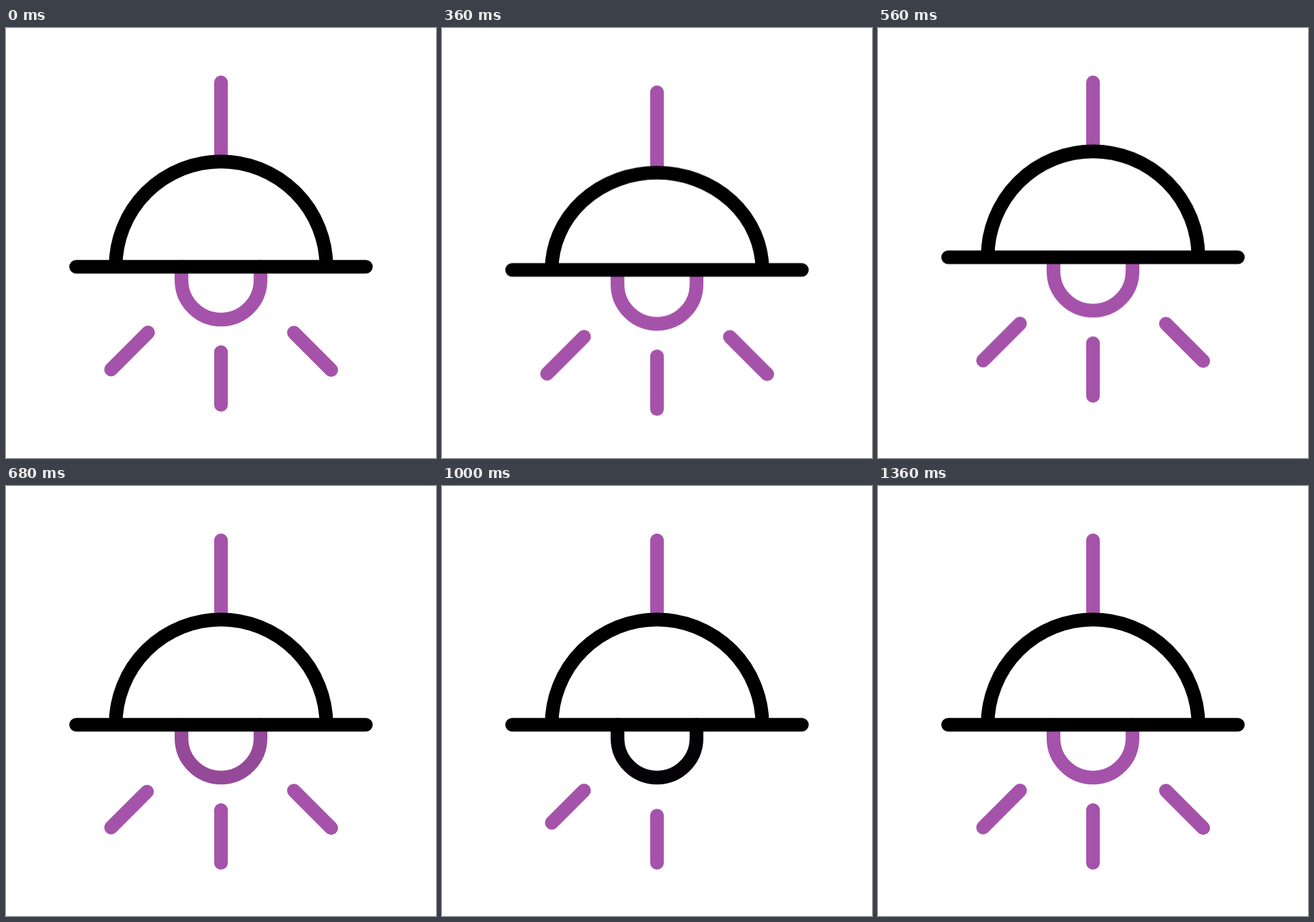
Write an HTML page that moves like this. It is 640x640 px and loops after 1480 ms.

```html
<!DOCTYPE html>
<html lang="en">
<head>
<meta charset="utf-8">
<title>Pendant lamp</title>
<style>
  html, body { margin: 0; width: 100%; height: 100%; overflow: hidden; background: #fff; }
  svg { display: block; width: 100vw; height: 100vh; }
  path { fill: none; stroke-width: 20.4; stroke-linecap: round; }
  .light path { stroke: #a553aa; }
  .shade path { stroke: #000; }

  .move { animation: 1480ms cubic-bezier(.333, 0, .667, 1) infinite; }
  .cord { stroke: #a553aa; animation-name: cord; }
  .shade { animation-name: shade; }
  .shade .dome { stroke-linecap: butt; animation-name: dome; }
  .light { animation-name: light; }
  .light .bulb { animation-name: bulb; }
  /* One period of the dash pattern sweeps the ray out and draws it again. */
  .ray { stroke-dasharray: 1 1.02; }
  .left { animation-name: left; }
  .right { animation-name: right; }
  .mid { animation-name: mid; }

  @keyframes cord {
    0%, 5.405%, 43.243%, 100% { d: path("M320 81L320 195"); }
    18.919% { d: path("M320 103.6L320 237.2"); }
    32.432% { d: path("M320 81L320 165"); }
  }
  @keyframes shade {
    0%, 5.405%, 43.243%, 100% { transform: translateY(0); }
    18.919% { transform: translateY(22.6px); }
    32.432% { transform: translateY(-28.3px); }
  }
  @keyframes dome {
    0%, 5.405%, 43.243%, 100% { d: path("M163.2 355.4A156.8 156.8 0 0 1 476.8 355.4"); }
    18.919% { d: path("M163.2 355.4A156.8 137.2 0 0 1 476.8 355.4"); }
    32.432% { d: path("M163.2 355.4A156.8 158.8 0 0 1 476.8 355.4"); }
  }
  @keyframes light {
    0%, 5.405%, 43.243%, 100% { transform: translateY(0); }
    18.919% { transform: translateY(24.2px); }
    32.432% { transform: translateY(-26.7px); }
  }
  @keyframes bulb {
    0%, 43.243%, 91.892%, 100% { stroke: #a553aa; }
    56.757%, 64.865% { stroke: #000; }
  }
  @keyframes left {
    0%, 44.595% { stroke-dashoffset: 0; }
    58.108% { stroke-dashoffset: -1.01; }
    70.27%, 100% { stroke-dashoffset: -2.02; }
  }
  @keyframes right {
    0%, 54.054% { stroke-dashoffset: 0; }
    67.568% { stroke-dashoffset: -1.01; }
    81.081%, 100% { stroke-dashoffset: -2.02; }
  }
  @keyframes mid {
    0%, 64.865% { stroke-dashoffset: 0; }
    78.378% { stroke-dashoffset: -1.01; }
    91.892%, 100% { stroke-dashoffset: -2.02; }
  }
</style>
</head>
<body>
<svg viewBox="0 0 640 640">
  <path class="move cord" d="M320 81L320 195"/>
  <g class="move light">
    <path class="move bulb" d="M261.2 355.4V375.2A58.8 58.8 0 0 0 378.8 375.2V355.4"/>
    <path class="move ray left" pathLength="1" d="M211.4 453.3L156.4 508.3"/>
    <path class="move ray mid" pathLength="1" d="M320 482.4V560.8"/>
    <path class="move ray right" pathLength="1" d="M428.5 453.5L484 509"/>
  </g>
  <g class="move shade">
    <path class="move dome" d="M163.2 355.4A156.8 156.8 0 0 1 476.8 355.4"/>
    <path d="M104.4 355.4H535.6"/>
  </g>
</svg>
<script>
  // Hold each pose for 40 ms (25 poses a second).
  const LOOP = 1480, STEP = 40;
  const start = performance.now();
  const anims = document.getAnimations();
  anims.forEach(a => a.pause());

  function tick() {
    const t = performance.now() - start + 0.5;
    const pose = Math.floor((t % LOOP) / STEP) * STEP;
    anims.forEach(a => { a.currentTime = pose; });
    requestAnimationFrame(tick);
  }
  tick();
</script>
</body>
</html>
```
